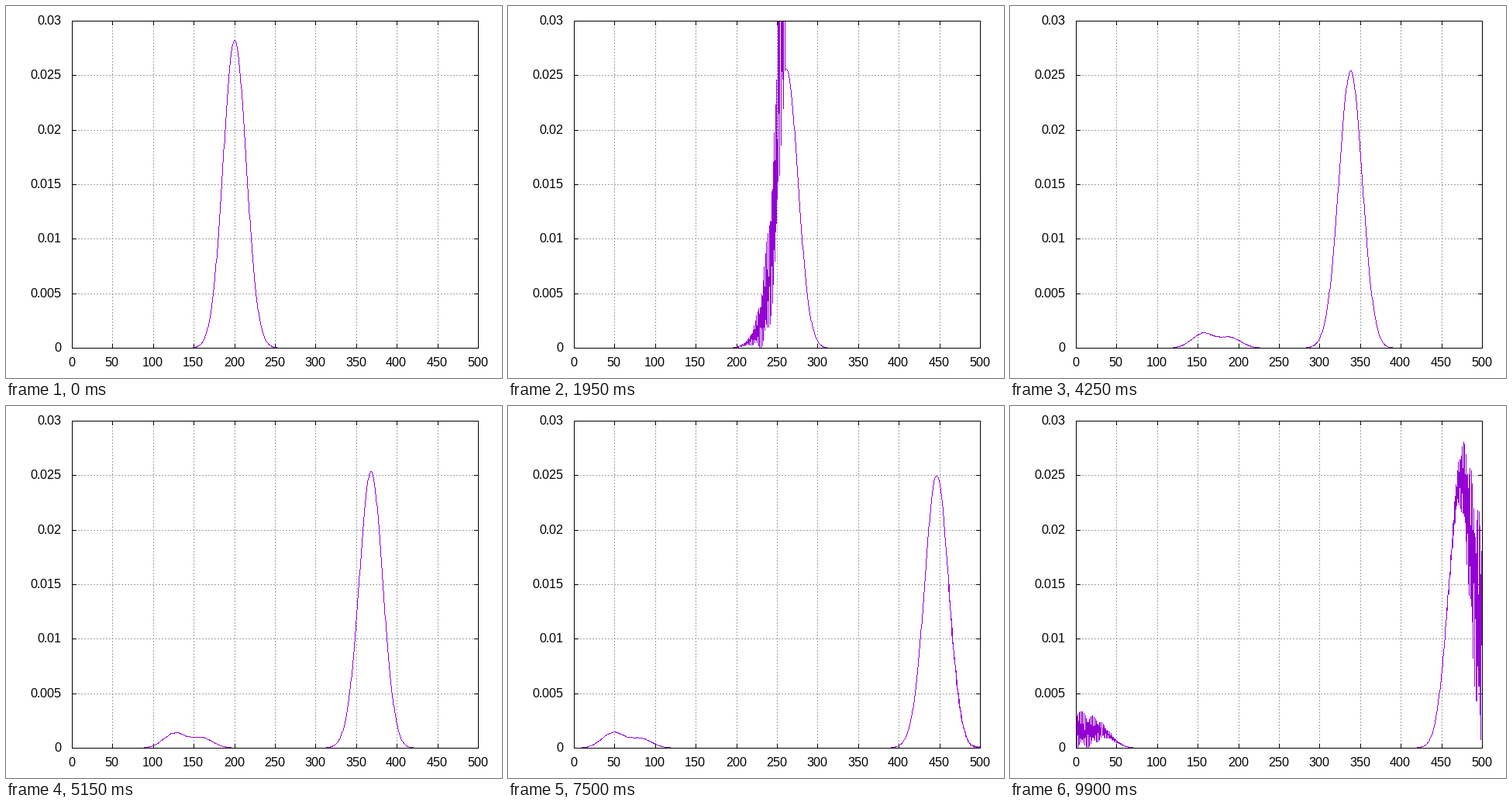
Write a matplotlib script that moves like this. It is 640 px wide and 480 px high and loops after 9950 ms.

```python
"""Quantum wave packet scattering on a low barrier inside a closed box."""
import numpy as np
import matplotlib.pyplot as plt
from matplotlib.animation import FuncAnimation

W, H, DPI = 640, 480, 64
LEFT, RIGHT, TOP, BOTTOM = 85, 609, 19, 441
X_MAX, Y_MAX = 500, 0.03
TICK = 5
FRAMES, INTERVAL = 199, 50
PURPLE, GREY, BLACK = (148, 0, 211), (160, 160, 160), (0, 0, 0)

plt.rcParams["font.family"] = "Liberation Sans"
plt.rcParams["text.hinting"] = "default"
plt.rcParams["text.hinting_factor"] = 1

# Physics, with hbar = m = 1
DX, DT, STEPS = 0.5, 0.1, 10
K0, X0, SIGMA = 2.0, 200.0, 20.0
x = np.arange(0, X_MAX, DX)


def evolve():
    """Density of every frame, using Crank-Nicolson phases per eigenstate."""
    barrier = np.where((x >= 250) & (x < 260), 1.0, 0.0)
    hop = np.full(len(x) - 1, -0.5 / DX**2)
    ham = np.diag(1 / DX**2 + barrier) + np.diag(hop, 1) + np.diag(hop, -1)
    energy, states = np.linalg.eigh(ham)

    psi = np.exp(-((x - X0) ** 2) / (2 * SIGMA**2) + 1j * K0 * x)
    psi /= np.sqrt(np.sum(np.abs(psi) ** 2) * DX)
    angle = -2 * np.arctan(energy * DT / 2) * STEPS
    phases = np.exp(1j * np.outer(angle, np.arange(FRAMES)))
    waves = (states.T @ psi)[:, None] * phases
    return (states @ waves.real) ** 2 + (states @ waves.imag) ** 2


def to_px(v):
    return np.floor(LEFT + v * (RIGHT - LEFT) / X_MAX + 0.5).astype(int)


def to_py(v):
    return BOTTOM - np.floor(v * (BOTTOM - TOP) / Y_MAX + 0.5).astype(int)


def trace(px, py):
    """Pixels of a polyline with steps of at most one column, drawn downwards."""
    dx, dy = np.diff(px), np.diff(py)
    rising = dy < 0
    x0 = np.where(rising, px[1:], px[:-1])
    y0 = np.minimum(py[1:], py[:-1])
    side = np.where(rising, -dx, dx)
    height = np.abs(dy)
    length = np.maximum(height, 1)

    seg = np.repeat(np.arange(len(dx)), length + 1)
    starts = np.cumsum(length + 1) - (length + 1)
    step = np.arange(len(seg)) - starts[seg]
    cols = x0[seg] + side[seg] * (2 * step >= length[seg])
    rows = y0[seg] + np.minimum(step, height[seg])
    return cols, rows


fig = plt.figure(figsize=(W / DPI, H / DPI), dpi=DPI, facecolor="white")
paper = np.full((H, W, 3), 255, dtype=np.uint8)
ticks = []


def dotted(line):
    """Two pixels on, two pixels off."""
    line[0::4] = GREY
    line[1::4] = GREY


def label(px, py, value, align):
    fig.text(px / W, 1 - py / H, f"{value:g}", size=16 * 72 / DPI,
             ha=align, va="baseline")


x_values = np.arange(0, X_MAX + 1, 50)
y_values = np.arange(7) * 0.005

for value in x_values:
    px = to_px(value)
    dotted(paper[TOP:BOTTOM + 1, px])
    label(px - 0.5, 465, value, "center")

for value in y_values:
    py = to_py(value)
    dotted(paper[py, LEFT:RIGHT + 1])
    label(71, py + 5, value, "right")

for px in to_px(x_values):
    paper[TOP:TOP + TICK + 1, px] = BLACK
    paper[BOTTOM - TICK:BOTTOM + 1, px] = BLACK

for py in to_py(y_values):
    paper[py, LEFT:LEFT + TICK + 1] = BLACK
    paper[py, RIGHT - TICK:RIGHT + 1] = BLACK

paper[[TOP, BOTTOM], LEFT:RIGHT + 1] = BLACK
paper[TOP:BOTTOM + 1, [LEFT, RIGHT]] = BLACK

picture = fig.figimage(paper, origin="upper")
density = evolve()
columns = to_px(x)


def draw(n):
    cols, rows = trace(columns, to_py(density[:, n]))
    inside = (cols > LEFT) & (cols < RIGHT) & (rows > TOP) & (rows < BOTTOM)
    page = paper.copy()
    page[rows[inside], cols[inside]] = PURPLE
    picture.set_data(page)
    return (picture,)


anim = FuncAnimation(fig, draw, frames=FRAMES, interval=INTERVAL,
                     repeat=True, repeat_delay=0)
plt.show()
```
